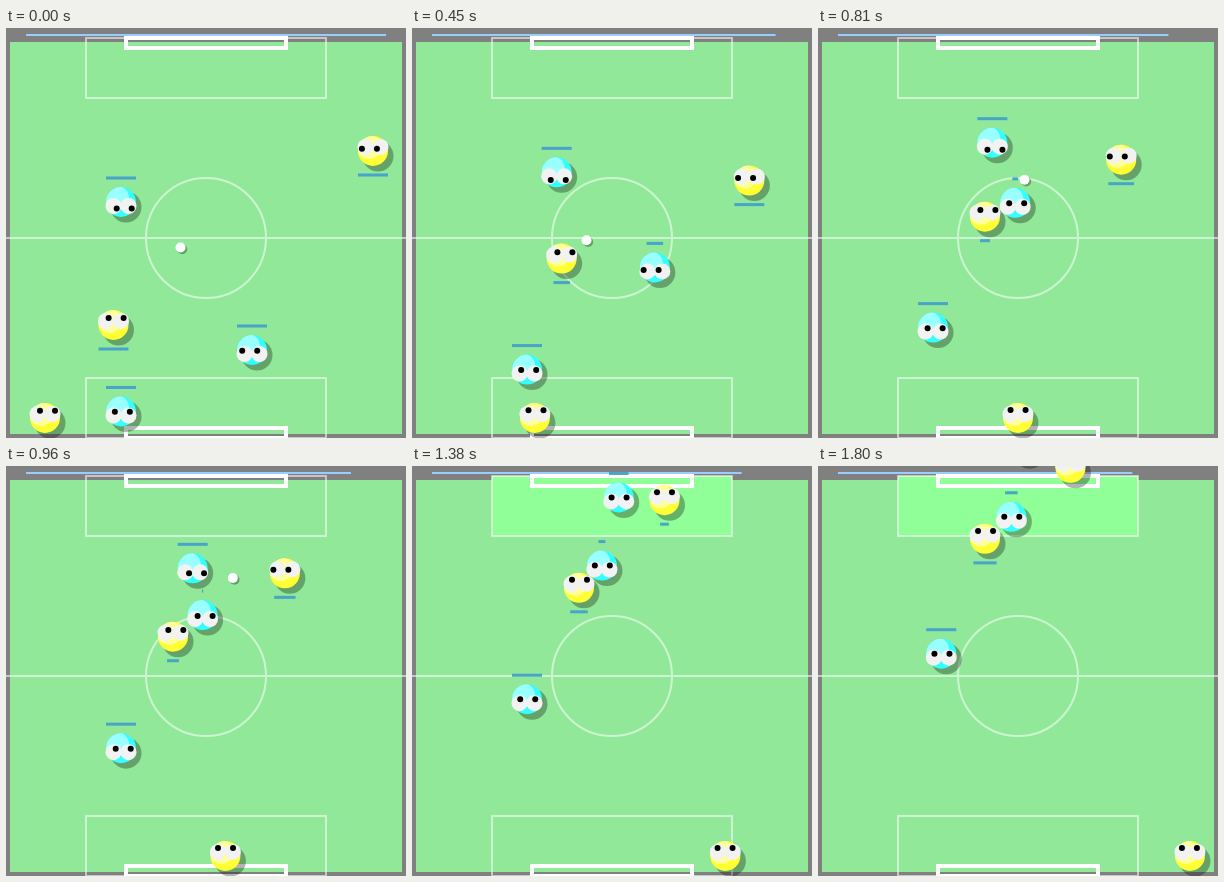
Animation, 400 px wide and 410 px high, one loop 1.83 s. Source, as an HTML page with a canvas:

```html
<!DOCTYPE html>
<html lang="en">
<head>
<meta charset="utf-8">
<title>Football match</title>
<style>
html, body { margin: 0; height: 100%; overflow: hidden; background: #808080; }
canvas { display: block; }
</style>
</head>
<body>
<canvas width="400" height="410"></canvas>
<script>
const ctx = document.querySelector('canvas').getContext('2d');
const LOOP = 1830, STEP = 30;
const WALK = 0.1165, RUN = 2 * WALK, PUSH = 0.14; // px per ms
const RAMP = 180; // ms to settle into a new velocity
const FULL = 30, DRAIN = 0.03, RECOVER = 0.0135;
const N = 0, NE = 45, E = 90, SW = 225, NW = 315, S = 180;

const cyan = { body: '#33ffff', light: '#99ffff', side: 1 };
const yellow = { body: '#ffff33', light: '#ffff99', side: -1 };

// Each leg is a start time, a compass heading in degrees and a speed.
const players = [
  { team: cyan, from: [115, 174], legs: [[0, NE, WALK], [1030, NE, RUN], [1072, N, RUN], [1500, N, 0]] },
  { team: cyan, from: [246, 322], legs: [[0, N, RUN], [367, NW, RUN], [667, N, RUN], [770, N, PUSH], [960, -22, WALK], [1140, 4, WALK]] },
  { team: cyan, from: [115, 383.5], legs: [[0, N, WALK], [1390, NE, WALK], [1490, N, WALK]] },
  { team: yellow, from: [367, 123], legs: [[0, SW, WALK], [440, NW, WALK], [670, NW, RUN], [1030, N, 0.18], [1530, S, 0.06]] },
  { team: yellow, from: [107.5, 297], legs: [[0, N, RUN], [104, NE, RUN], [465, N, 0], [540, N, PUSH], [715, N, WALK]] },
  { team: yellow, from: [39, 390], legs: [[0, E, RUN], [665, E, WALK], [890, E, RUN], [1373, E, WALK]] }
];
const kicked = { from: [174.5, 219.5], legs: [[0, N, 0.02], [500, 29, 0.3], [870, 16, 0.29]] };

// Distance covered per unit of speed while a velocity change takes hold
const ramp = u => u < RAMP ? u * u / (2 * RAMP) : u - RAMP / 2;

function position({ from, legs }, t) {
  let [x, y] = from, vx = 0, vy = 0;
  for (const [begin, heading, speed] of legs) {
    if (t <= begin) break;
    const a = heading * Math.PI / 180, nx = speed * Math.sin(a), ny = -speed * Math.cos(a);
    x += (nx - vx) * ramp(t - begin);
    y += (ny - vy) * ramp(t - begin);
    [vx, vy] = [nx, ny];
  }
  return [x, y];
}

// Only walking restores stamina.
function stamina(legs, t) {
  let left = FULL;
  legs.forEach(([begin, , speed], i) => {
    const end = i + 1 < legs.length ? legs[i + 1][0] : LOOP;
    const spent = Math.max(0, Math.min(t, end) - begin);
    left += spent * (speed === WALK ? RECOVER : -DRAIN);
    left = Math.max(0, Math.min(FULL, left));
  });
  return left;
}

function disc(x, y, r, color) {
  ctx.fillStyle = color;
  ctx.beginPath();
  ctx.arc(x, y, r, 0, 7);
  ctx.fill();
}

function box(x, y, w, h, color) {
  ctx.fillStyle = color;
  ctx.fillRect(x, y, w, h);
}

function drawPitch(t, scored) {
  box(0, 0, 400, 410, '#808080');
  box(4, 14, 392, 392, '#90e898');
  if (scored) box(80, 10, 240, 60, '#90ff98');

  ctx.strokeStyle = 'rgba(255,255,255,.55)';
  ctx.lineWidth = 2;
  ctx.strokeRect(80, 10, 240, 60);
  ctx.strokeRect(80, 350, 240, 60);
  ctx.beginPath();
  ctx.moveTo(0, 210);
  ctx.lineTo(400, 210);
  ctx.moveTo(260, 210);
  ctx.arc(200, 210, 60, 0, 2 * Math.PI);
  ctx.stroke();

  ctx.strokeStyle = '#fff';
  ctx.lineWidth = 4;
  ctx.strokeRect(120, 10, 160, 10);
  ctx.strokeRect(120, 400, 160, 10);
  box(20, 6, 360 - t * 0.0365, 2, '#99ccff');
}

function drawPlayer({ team, legs }, [x, y], ball, t) {
  const { body, light, side } = team;
  disc(x, y, 15, body);
  ctx.save();
  ctx.clip();
  disc(x - 4, y - 4, 12, light);
  ctx.restore();

  const gaze = Math.atan2(ball[1] - y, ball[0] - x);
  const eyes = [x - 7.5, x + 7.5], eyeY = y + 4 * side;
  for (const ex of eyes) disc(ex, eyeY, 8, '#f2f2f2');
  for (const ex of eyes) disc(ex + 4 * Math.cos(gaze), eyeY + 4 * Math.sin(gaze), 3, '#000');

  const w = stamina(legs, t);
  box(x - w / 2, y - 24 * side - 1.5, w, 3, '#48a4c8');
}

function draw(t) {
  let ball = position(kicked, t);
  const scored = ball[1] < 5;
  if (scored) ball = [250, -500];
  drawPitch(t, scored);

  const spots = players.map(p => position(p, t));
  for (const [x, y] of spots) disc(x + 5, y + 5, 15.5, 'rgba(0,0,0,.3)');
  players.forEach((p, i) => drawPlayer(p, spots[i], ball, t));
  disc(ball[0] + 1.7, ball[1] + 1.7, 5, 'rgba(0,0,0,.3)');
  disc(...ball, 5, '#fff');
}

const start = performance.now();
function tick() {
  const t = (performance.now() - start) % LOOP;
  draw(Math.floor(t / STEP) * STEP);
  requestAnimationFrame(tick);
}
tick();
</script>
</body>
</html>
```
